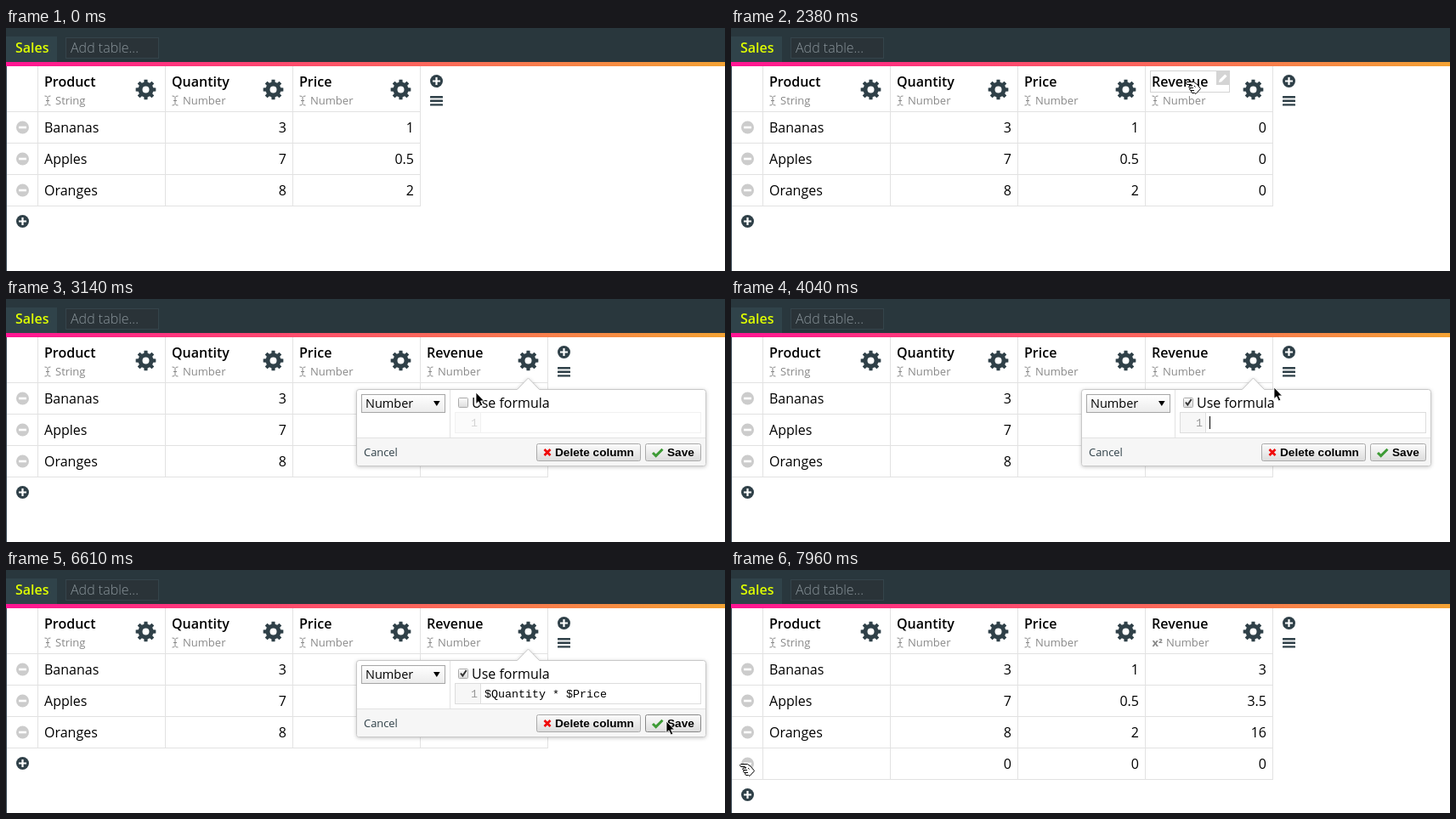
Recreate the animation shown at these times as an HTML page. Size 846x286 px, loop 7990 ms.

```html
<!DOCTYPE html>
<html lang="en">
<head>
<meta charset="utf-8">
<title>Sales table</title>
<style>
  html, body { margin: 0; width: 100%; height: 100%; overflow: hidden; background: #fff; }
  svg { display: block; width: 846px; height: 286px; }
  text { font: 16px "Open Sans", "Noto Sans", sans-serif; fill: #000; white-space: pre; }
  text.head { font-weight: 600; }
  text.kind { font-size: 13px; fill: #888; }
  text.num { text-anchor: end; }
  text.code { font: 13.333px "Liberation Mono", monospace; }
  text.button { font: bold 13.6px "Liberation Sans", sans-serif; }
  .rule { stroke: #e2e2e2; fill: none; }
  .dark { fill: #2f4048; }
</style>
</head>
<body>
<svg id="stage" viewBox="0 0 846 286" xmlns="http://www.w3.org/2000/svg"></svg>
<script>
const LOOP = 7990;
const stage = document.getElementById('stage');
const text = (x, y, s, cls = '', extra = '') => `<text x="${x}" y="${y}" class="${cls}" ${extra}>${s}</text>`;
const rect = (x, y, w, h, fill, extra = '') => `<rect x="${x}" y="${y}" width="${w}" height="${h}" fill="${fill}" ${extra}/>`;
const path = (d, extra = '') => `<path d="${d}" ${extra}/>`;
const group = (id, body) => `<g id="${id}">${body}</g>`;

function gearPath(cx, cy) {
  const points = [];
  for (let k = 0; k < 8; k++) {
    for (const [r, a] of [[9, -14], [12, -9.5], [12, 9.5], [9, 14]]) {
      const angle = (k * 45 + a) * Math.PI / 180;
      points.push(`${(cx + r * Math.cos(angle)).toFixed(2)} ${(cy + r * Math.sin(angle)).toFixed(2)}`);
    }
  }
  return `M${points.join('L')}ZM${cx - 4} ${cy}a4 4 0 1 0 8 0a4 4 0 1 0 -8 0Z`;
}
const gear = (x, y) => path(gearPath(x, y), 'class="dark" fill-rule="evenodd"');

const disc = (x, y, plus) =>
  `<circle cx="${x}" cy="${y}" r="7.5" fill="${plus ? '#2f4048' : '#ccc'}"/>` +
  path(`M${x - 4.5} ${y}h9${plus ? `M${x} ${y - 4.5}v9` : ''}`, `stroke="#fff" stroke-width="${plus ? 2.2 : 2.6}"`);

const beam = (x, y) =>
  path(`M${x - 3.5} ${y - 5.5}q3 0 3.5 1.5q.5 -1.5 3.5 -1.5M${x} ${y - 4}v8M${x - 3.5} ${y + 5.5}q3 0 3.5 -1.5q.5 1.5 3.5 1.5M${x - 2} ${y}h4`,
    'fill="none" stroke="#888"');

const kindLabel = (x, s) => beam(x + 4, 85.5) + text(x + 13, 90, s, 'kind');
const column = (x, name, kind) => text(x, 69, name, 'head') + kindLabel(x, kind) + gear(x + 119.5, 72.5);

const rows = [['Bananas', '3', '1', '3'], ['Apples', '7', '0.5', '3.5'], ['Oranges', '8', '2', '16']];
const baseline = i => 123 + 37 * i;
const row = ([name, quantity, price], i) =>
  disc(19.5, 117 + 37 * i, false) + text(45, baseline(i), name) +
  text(330, baseline(i), quantity, 'num') + text(480, baseline(i), price, 'num');
const revenue = pick => rows.map((r, i) => text(630, baseline(i), pick(r), 'num')).join('');

const header =
  rect(0, 0, 846, 40, '#29373d') + rect(0, 10, 60, 30, '#30434a') +
  text(11, 29, 'Sales', 'head', 'style="fill:#dfff00"') +
  rect(70.5, 11.5, 109, 24, '#2a3338', 'stroke="#35444b"') +
  text(76, 29, 'Add table...', '', 'style="fill:#89949a;font-weight:300"') +
  rect(0, 40, 846, 5, 'url(#stripe)') + rect(0, 45, 1, 241, '#3b4a55');

const table =
  path('M1 98.5H488M1 135.5H488M1 172.5H488M1 209.5H488M37.5 45V210M187.5 45V210M337.5 45V210M487.5 45V210', 'class="rule"') +
  column(45, 'Product', 'String') + column(195, 'Quantity', 'Number') + column(345, 'Price', 'Number') +
  rows.map(row).join('');

const revenueColumn =
  path('M488 98.5H638M488 135.5H638M488 172.5H638M488 209.5H638M637.5 45V210', 'class="rule"') +
  rect(493.5, 50.5, 93, 25, '#fff', 'id="titleBox" stroke="#ccc"') +
  text(495, 69, '', 'head', 'id="title"') +
  group('pencil', rect(571, 51, 15.5, 16, '#d4d4d4') +
    path('M574 64l.8 -3.2l6.4 -6.4l2.4 2.4l-6.4 6.4Z', 'fill="#fff"')) +
  gear(614.5, 72.5) +
  group('plain', kindLabel(495, 'Number') + revenue(() => '0')) +
  group('computed', text(495.5, 90, 'x²', 'kind', 'style="font-weight:700"') +
    text(512, 90, 'Number', 'kind') + revenue(r => r[3]));

const newRow =
  path('M1 246.5H638M37.5 210V247M187.5 210V247M337.5 210V247M487.5 210V247M637.5 210V247', 'class="rule"') +
  disc(19.5, 228, false) + [330, 480, 630].map(x => text(x, 234, '0', 'num')).join('');

const columnTools = disc(506.5, 62.5, true) +
  [80, 84.6, 89.2].map(y => rect(499, y, 15, 2.4, '#2f4048', 'rx=".5"')).join('');

const popup =
  path('M415.5 106.5H601.5L614.5 93L627.5 106.5H820.5a3 3 0 0 1 3 3V193.5a3 3 0 0 1 -3 3H415.5a3 3 0 0 1 -3 -3V109.5a3 3 0 0 1 3 -3Z',
    'fill="#fff" stroke="#c8c8c8" style="filter:drop-shadow(0 1px 2px rgba(0,0,0,.22))"') +
  path('M413 163.5H823V193a3 3 0 0 1 -3 3H416a3 3 0 0 1 -3 -3Z', 'fill="#f6f6f6"') +
  path('M413 163.5H823M522.5 107V163', 'class="rule"') +
  rect(418.5, 112.5, 98, 21, 'url(#control)', 'stroke="#a6a6a6"') +
  text(423, 128, 'Number', '', 'style="font-size:14.5px"') + path('M503 120h7.6l-3.8 6Z') +
  rect(532.5, 116.5, 11, 11, 'url(#button)', 'stroke="#aaa" rx="1"') +
  path('M535 121.5l2.3 3l4.4 -6.5', 'id="tick" fill="none" stroke="#333" stroke-width="2"') +
  text(548, 128, 'Use formula') +
  group('editor', rect(528.5, 133.5, 289, 24, '#fff', 'stroke="#ddd"') + rect(529, 134, 29, 23, '#f7f7f7') +
    path('M558.5 134V157', 'stroke="#ddd"') + text(555, 150, '1', 'code num', 'style="fill:#999"')) +
  text(563, 150, '', 'code', 'id="formula"') +
  rect(0, 138, 1, 15, '#000', 'id="caret"') +
  text(421, 185, 'Cancel', '', 'style="font-size:12.9px;fill:#2f4048"') +
  rect(624.5, 170.5, 122, 20, 'url(#button)', 'stroke="#aaa" rx="2"') +
  path('M633.5 177l7 7m0 -7l-7 7', 'stroke="#f00a0a" stroke-width="2.8"') +
  text(646, 185, 'Delete column', 'button') +
  rect(752.5, 170.5, 65, 20, 'url(#button)', 'id="save" stroke="#aaa" rx="2"') +
  path('M761 181l3.7 3.6l7.8 -7.8', 'fill="none" stroke="#3d9b35" stroke-width="3"') +
  text(778, 185, 'Save', 'button');

const pointers =
  group('arrow', path('M0 0V13.5L3 10.8L5.4 16L7.8 15L5.5 9.9H9.5Z', 'stroke="#fff" stroke-width=".8"')) +
  group('hand', path('M-.5 .5L.5 -.5H8.5L12.5 2.5L16.5 7.5L11 13.5L9.5 12.5H6.5L5.5 11L6.5 9.5H4.5L3.5 8L5 6.5H3.5L2.5 5L4 4H7L5 2.5H.5Z',
    'fill="#fff" stroke="#000"') + path('M5 6.5H8M6.5 9.5H9M9 4L10.5 5.5', 'stroke="#000" fill="none"')) +
  group('ibeam', path('M-3.5 -7.5h3l.5 .5l.5 -.5h3M0 -7V7M-3.5 7.5h3l.5 -.5l.5 .5h3', 'stroke="#000" fill="none"'));

stage.innerHTML = `<defs>
  <linearGradient id="stripe"><stop stop-color="#ff1493"/><stop offset=".5" stop-color="#fc5a63"/><stop offset="1" stop-color="#f3a233"/></linearGradient>
  <linearGradient id="control" x2="0" y2="1"><stop stop-color="#fff"/><stop offset="1" stop-color="#ececec"/></linearGradient>
  <linearGradient id="button" x2="0" y2="1"><stop stop-color="#fcfcfc"/><stop offset="1" stop-color="#dcdcdc"/></linearGradient>
</defs>` + rect(0, 0, 846, 286, '#fff') + header + table + group('revenueColumn', revenueColumn) +
  group('columnTools', columnTools) + group('newRow', newRow) + group('rowTool', disc(19.5, 227.5, true)) +
  group('popup', popup) + group('pointer', pointers);

const el = {};
stage.querySelectorAll('[id]').forEach(node => { el[node.id] = node; });

const TITLE = 'Revenue', FORMULA = '$Quantity * $Price';
const spread = (from, to, n) => Array.from({ length: n }, (_, i) => from + (to - from) * i / (n - 1));
const titleKeys = spread(1510, 1840, 7);
const formulaKeys = [4300, ...spread(4490, 5090, 9), 5350, 5410, ...spread(5670, 6000, 6)];
const typed = (s, keys, t) => s.slice(0, keys.filter(k => t >= k).length);

// Each move: start, end, from, to
const moves = [
  [490, 530, 512, 62, 505, 61],
  [830, 1000, 505, 61, 536, 64],
  [2380, 2540, 536, 64, 609, 69],
  [2900, 3240, 609, 69, 539, 121],
  [3540, 3760, 539, 121, 610, 147],
  [3950, 4040, 610, 147, 638.5, 104],
  [6240, 6590, 638.5, 104, 776.5, 177.5],
  [6980, 7040, 776.5, 177.5, 553, 228],
  [7340, 7610, 113, 284, 11, 229]
];

function pointerAt(t) {
  if (t < 490 || (t >= 7050 && t < 7350)) return null;
  const [start, end, x0, y0, x1, y1] = moves.filter(m => t >= m[0]).pop();
  const p = Math.min(1, (t - start) / (end - start));
  const e = p * p * (3 - 2 * p);
  return [x0 + (x1 - x0) * e, y0 + (y1 - y0) * e];
}

function pointerKind(t, x, y) {
  if (t < 2940 || (t > 7350 && x < 28)) return 'hand';
  const inEditor = t > 3460 && t < 6690 && x > 559 && x < 818 && y > 134 && y < 158;
  return inEditor ? 'ibeam' : 'arrow';
}

const show = (node, on) => { node.style.display = on ? '' : 'none'; };
const ramp = (t, from, to) => Math.max(0, Math.min(1, (t - from) / (to - from)));

function draw(t) {
  const pos = pointerAt(t);
  const [x, y] = pos || [0, 0];
  const added = t >= 810, editing = t >= 1250 && t < 2160;
  const hover = added && t < 2540 && x < 587 && !editing;

  show(el.revenueColumn, added);
  el.columnTools.setAttribute('transform', `translate(${added ? 150 : 0} 0)`);
  el.title.textContent = typed(TITLE, titleKeys, t);
  show(el.titleBox, editing || hover);
  el.titleBox.setAttribute('stroke', editing ? '#aaa' : '#d4d4d4');
  show(el.pencil, hover);
  show(el.plain, t < 6710);
  show(el.computed, t >= 6710);

  show(el.newRow, t >= 7940);
  el.rowTool.setAttribute('transform', `translate(0 ${t >= 7940 ? 37 : 0})`);

  const opacity = ramp(t, 2690, 2850) * (1 - ramp(t, 6680, 6760));
  show(el.popup, opacity > 0);
  el.popup.setAttribute('opacity', opacity);
  show(el.tick, t >= 3460);
  el.editor.setAttribute('opacity', t >= 3460 ? 1 : .4);
  const formula = typed(FORMULA, formulaKeys, t);
  el.formula.textContent = formula;
  el.caret.setAttribute('x', 563 + 8 * formula.length);
  show(el.caret, (t >= 3930 && t < 4180) || (t >= 4300 && t < 6530));
  el.save.setAttribute('stroke', t > 6300 && x > 752 && y > 170 ? '#888' : '#aaa');

  show(el.pointer, pos);
  if (pos) {
    el.pointer.setAttribute('transform', `translate(${Math.round(x)} ${Math.round(y)})`);
    const kind = pointerKind(t, x, y);
    for (const name of ['arrow', 'hand', 'ibeam']) show(el[name], name === kind);
  }
}

const began = performance.now();
function tick() {
  draw((performance.now() - began) % LOOP);
  requestAnimationFrame(tick);
}
tick();
</script>
</body>
</html>
```
